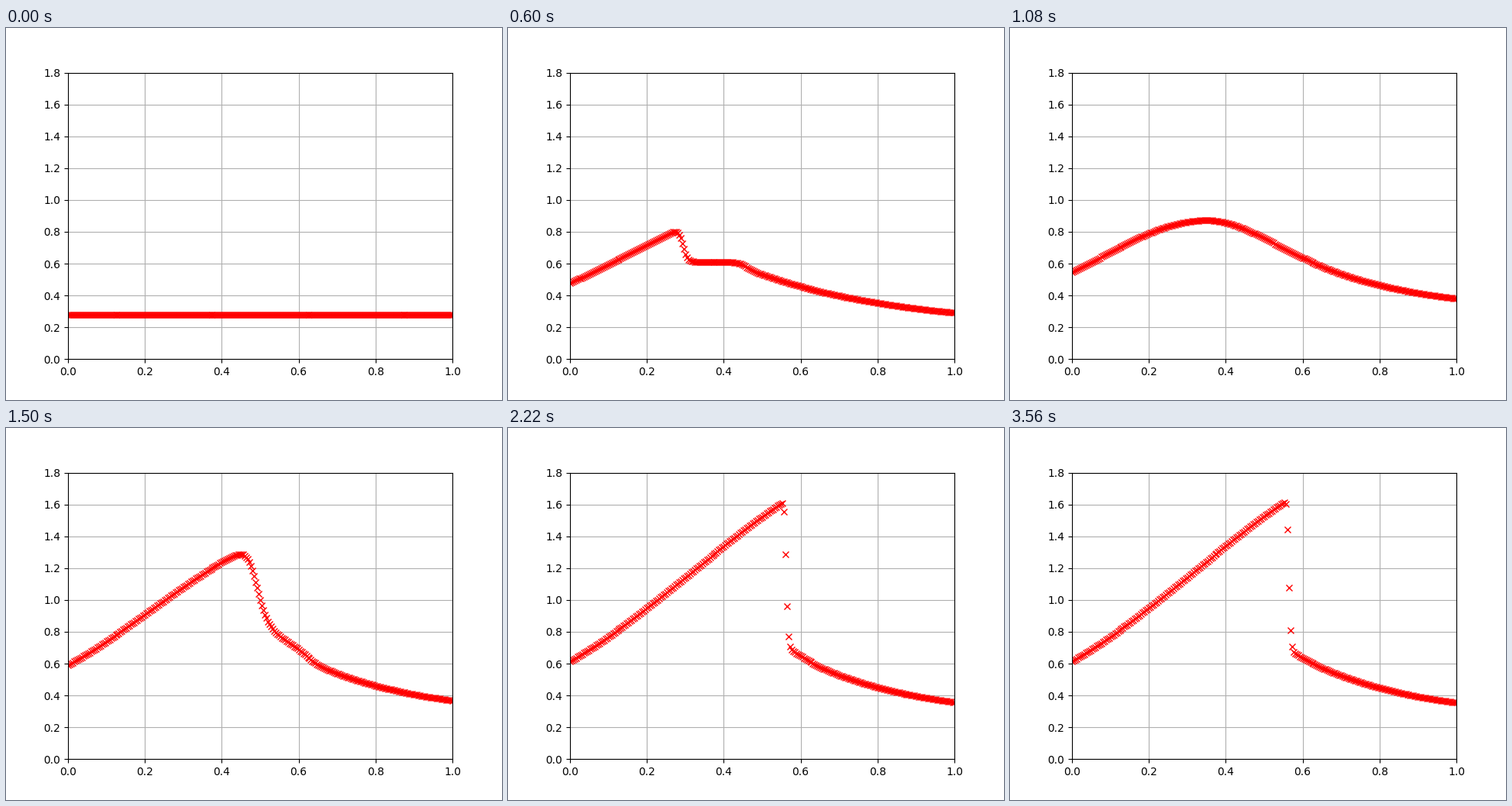
Recreate the animation shown at these times as a matplotlib script. Size 640 by 480 pixels, loop 3.62 s.

```python
import numpy as np
import matplotlib.pyplot as plt
from matplotlib.animation import FuncAnimation

STEP_TICKS = 3      # the plot advances every third 20 ms tick
LAST_STEP = 59
START_MACH = 0.281
WAVE_SEEN, WAVE_GONE, SHOCK_BORN = 10, 18, 25

x = np.linspace(0, 1, 251)


def lerp(a, b, s):
    return a + (b - a) * s


def sigmoid(z):
    return 1 / (1 + np.exp(-np.clip(z, -40, 40)))


def dip(u, depth, width):
    """Smooth drop away from a peak at u = 0, levelling off at depth."""
    return depth * u ** 2 / (u ** 2 + width ** 2)


# Mach number after the first wave has crossed the nozzle
swept = .872 - np.where(x < .35, dip(x - .35, .98, .494),
                        dip(x - .35, .606, .3133))

# On both sides of the first wave
tail = .199 + .333 * np.exp(-2.576 * (x - .5))
tail += .015 * np.exp(-((x - .445) / .02) ** 2)
ahead = np.minimum(np.minimum(.42 + .65 * x, .611), tail)
behind = np.minimum(.476 + 1.21 * x, .952 * swept)

# On both sides of the settled shock
supersonic = .614 + 1.386 * x + 1.827 * x ** 2 - 1.905 * x ** 3
subsonic = .262 + .372 * np.exp(-3.49 * (x - .6))


def first_wave(k):
    if k < WAVE_SEEN:
        g = k / WAVE_SEEN
        front = .2935 - .06 * (WAVE_SEEN - k)
        low = lerp(START_MACH, ahead, g)
        low = low - .075 * np.sin(np.pi * g) * x ** 3
        high = lerp(START_MACH, behind, np.sqrt(g))
    else:
        front = .2935 + .095 * (k - WAVE_SEEN)
        low = ahead
        high = lerp(behind, swept, (k - WAVE_SEEN) / (WAVE_GONE - WAVE_SEEN))
    return lerp(low, high, sigmoid((front - x) / .0055))


def standing_shock(k):
    s = k - SHOCK_BORN
    # the shock overshoots its resting place a little, then swings back
    center = .563 - .0745 * np.exp(-s / 5) * np.cos(.1108 * s)
    width = .00267 + .0106 * np.exp(-s / 2.5)
    left = supersonic * (1 - np.exp(-s / 2.9) * (.038 + .6 * x ** 3))
    right = subsonic + np.exp(-s / 8.7) * (
        .014 + .05 * sigmoid((.62 - x) / .015))
    u = (center - x) / width
    u = u + .00048 / width * np.maximum(u, 0) ** 2
    return lerp(right, left, sigmoid(u))


def mach(k):
    if k == 0:
        return np.full_like(x, START_MACH)
    if k <= WAVE_GONE:
        return first_wave(k)
    if k < SHOCK_BORN:
        s = (k - WAVE_GONE) / (SHOCK_BORN - WAVE_GONE)
        return lerp(swept, standing_shock(SHOCK_BORN), s)
    return standing_shock(k)


fig, ax = plt.subplots(figsize=(6.4, 4.8), dpi=100)
ax.set_xlim(0, 1)
ax.set_ylim(0, 1.8)
ax.grid()
points, = ax.plot(x, mach(0), "rx")


def update(i):
    points.set_ydata(mach(min(i // STEP_TICKS, LAST_STEP)))
    return points,


anim = FuncAnimation(fig, update, frames=181, interval=20, repeat=True,
                     repeat_delay=0)
plt.show()
```
